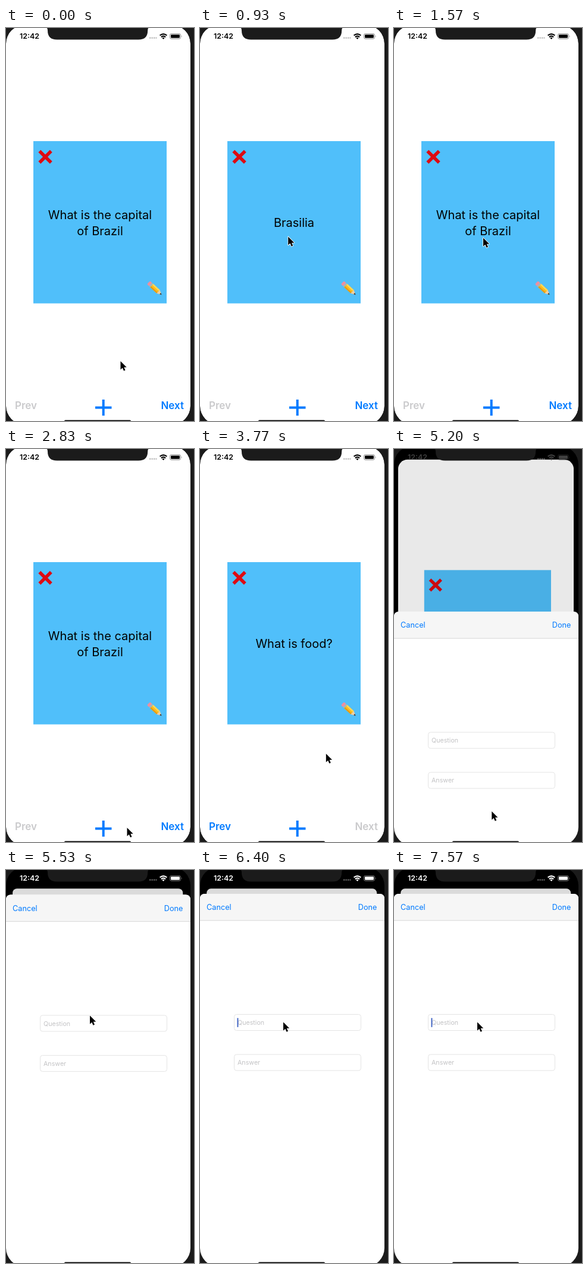
Write an HTML page that moves like this. It is 316 by 660 pixels and loops after 8 s.

```html
<!DOCTYPE html>
<html lang="en">
<head>
<meta charset="utf-8">
<title>Flashcards</title>
<style>
  html, body { margin: 0; width: 100%; height: 100%; overflow: hidden; background: #1b1b1b; }
  svg { display: block; width: 316px; height: 660px; }
  text { font-family: Inter, "Liberation Sans", sans-serif; }
  .card-text { font-size: 20px; text-anchor: middle; }
  .nav { font-size: 17px; font-weight: 600; }
  .bar { font-size: 12.7px; fill: #007aff; }
  .field { fill: #fff; stroke: #e4e4e4; }
  .hint { font-size: 10.7px; fill: #c3c3c5; }
</style>
</head>
<body>
<svg viewBox="0 0 316 660">
  <clipPath id="glass"><rect y="-5" width="310" height="671" rx="31"/></clipPath>

  <g clip-path="url(#glass)">
    <rect y="-5" width="310" height="671"/>

    <g id="deck">
      <rect class="page" y="-5" width="310" height="671" fill="#fff"/>
      <g id="card">
        <rect x="46" y="190" width="224" height="272.5" fill="#50bffa"/>
        <path d="M56.3 206.8 75.8 226M75.8 206.8 56.3 226" stroke="#de0a12" stroke-width="5.6"/>
        <g transform="translate(239.5 427.5) rotate(43)">
          <rect x="0" y="-3.8" width="5" height="7.6" rx="2" fill="#ee8fa0"/>
          <rect x="4.5" y="-3.8" width="3" height="7.6" fill="#a9b4ba"/>
          <rect x="7.5" y="-3.8" width="15" height="7.6" fill="#fdbd1c"/>
          <rect x="7.5" y="-3.8" width="15" height="2.4" fill="#ffd95a"/>
          <rect x="7.5" y="1.6" width="15" height="2.2" fill="#e89a12"/>
          <path d="M22.5-3.8 30 0 22.5 3.8z" fill="#f3cfa0"/>
          <path d="M27-1.6 30.3 0 27 1.6z" fill="#333"/>
        </g>
        <text id="line1" class="card-text" x="158"></text>
        <text id="line2" class="card-text" x="158" y="347.5"></text>
      </g>
      <text id="prev" class="nav" x="15" y="640">Prev</text>
      <text id="next" class="nav" x="299" y="640" text-anchor="end">Next</text>
      <path d="M150 637.5h27.5M163.7 624v27" stroke="#007aff" stroke-width="4"/>
      <rect id="dim" class="page" y="-5" width="310" height="671"/>
    </g>

    <g id="status" fill="currentColor">
      <text x="23" y="18.2" font-size="12.4" font-weight="600">12:42</text>
      <path d="M241 16.7h12.5" stroke="#999" stroke-opacity=".65" stroke-width="2.2" stroke-dasharray="2.4 1.1"/>
      <g fill="none" stroke="currentColor" stroke-width="2">
        <path d="M258.6 12.6q5.9-5 11.8 0M260.8 15.2q3.7-3.2 7.4 0"/>
      </g>
      <path d="M262.4 16.7q2.1-1.7 4.2 0l-2.1 2.2z"/>
      <rect x="275.5" y="9.5" width="18" height="8.8" rx="2.6" fill="none" stroke="currentColor" stroke-opacity=".45"/>
      <rect x="277" y="11" width="15" height="5.8" rx="1.4"/>
      <path d="M294.8 12.2q1.6 1.7 0 3.4z" fill-opacity=".5"/>
    </g>

    <g id="sheet">
      <rect width="310" height="680" rx="8" fill="#fff"/>
      <path d="M0 45V8q0-8 8-8h294q8 0 8 8v37z" fill="#f6f6f6"/>
      <path d="M0 44.8h310" stroke="#cfcfcf" stroke-width=".8"/>
      <text class="bar" x="11" y="27">Cancel</text>
      <text class="bar" x="297.5" y="27" text-anchor="end">Done</text>
      <rect class="field" x="57.5" y="202.5" width="213" height="27" rx="4"/>
      <rect class="field" x="57.5" y="269.8" width="213" height="27" rx="4"/>
      <text class="hint" x="63" y="220">Question</text>
      <text class="hint" x="63" y="287.2">Answer</text>
      <rect id="caret" x="62.5" y="208.5" width="1.9" height="15.5" rx=".8" fill="#3f63c4"/>
    </g>

    <rect x="98" y="658.6" width="112" height="4" rx="2"/>
  </g>

  <path d="M66-1q4 0 4 5 0 15.6 15.6 15.6h137q15.6 0 15.6-15.6 0-5 4-5z" fill="#1b1b1b"/>

  <path id="pointer" d="M0 0v14.2l3.3-3 2.2 5.1 2.5-1.1-2.2-4.9h4.4z"
        stroke="#fff" stroke-width="1.6" stroke-linejoin="round" paint-order="stroke"/>
</svg>

<script>
const LOOP = 8000;
const NEXT_TAP = 3400, SHEET_OPEN = 5086;
const FLIP_STARTS = [560, 1130, 4290], FLIP_TIME = 300;
const BLUE = '#007aff', GREY = '#cacacc';

// time, x, y of the pointer tip
const POINTER_PATH = [
  [0, 192.5, 559.5], [30, 192.5, 559.5], [500, 152, 358], [1000, 148, 350], [1570, 150, 352.5], [1700, 152, 356],
  [2320, 299, 632], [2500, 281, 638], [2830, 203.5, 636], [2970, 203.5, 636],
  [3320, 284, 634], [3450, 284, 634], [4180, 108, 336], [4320, 107, 335.5],
  [4620, 160, 636], [5060, 165, 636], [5200, 164.3, 608.5], [5530, 141, 244.5],
  [6100, 140, 255.5], [LOOP, 140, 255.5]
];

const $ = id => document.getElementById(id);
const clamp = v => Math.min(1, Math.max(0, v));
const mix = (a, b, k) => a + (b - a) * k;
const ease = k => k * k * (3 - 2 * k);
const ramp = (t, from, to) => clamp((t - from) / (to - from));

function pointerAt(t) {
  const i = Math.max(1, POINTER_PATH.findIndex(key => key[0] > t));
  const [t0, x0, y0] = POINTER_PATH[i - 1], [t1, x1, y1] = POINTER_PATH[i];
  const k = ease(ramp(t, t0, t1));
  return [mix(x0, x1, k), mix(y0, y1, k)];
}

// Critically damped spring
function spring(ms) {
  const k = 0.0185 * Math.max(0, ms);
  return 1 - (1 + k) * Math.exp(-k);
}

function drawCard(t) {
  const turns = FLIP_STARTS.reduce((sum, start) => sum + ease(ramp(t, start, start + FLIP_TIME)), 0);
  const width = Math.abs(Math.cos(Math.PI * turns));
  $('card').setAttribute('transform', `translate(158 0) scale(${Math.max(width, 0.001)} 1) translate(-158 0)`);

  const second = t >= NEXT_TAP;
  const answer = Math.round(turns) % 2 === 1;
  const lines = second
    ? [answer ? 'Tasty' : 'What is food?']
    : answer ? ['Brasilia'] : ['What is the capital', 'of Brazil'];
  $('line1').textContent = lines[0];
  $('line2').textContent = lines[1] || '';
  $('line1').setAttribute('y', lines.length > 1 ? 321 : 334.3);
  $('prev').setAttribute('fill', second ? BLUE : GREY);
  $('next').setAttribute('fill', second ? GREY : BLUE);
}

function drawSheet(t) {
  const p = spring(t - SHEET_OPEN);
  const scale = mix(1, 0.923, p);
  $('sheet').setAttribute('transform', `translate(0 ${mix(666, 40, p)})`);
  $('deck').setAttribute('transform', `translate(${155 * (1 - scale) - 0.8 * p} ${35.9 * p}) scale(${scale})`);
  document.querySelectorAll('.page').forEach(page => page.setAttribute('rx', mix(31, 8, p)));
  $('dim').setAttribute('opacity', 0.14 * p);
  const level = Math.round(255 * p ** 3);
  $('status').style.color = `rgb(${level},${level},${level})`;

  const shown = t < 7000 ? (t >= 6270 ? 1 - ramp(t, 6690, 6830) : 0) : ramp(t, 7400, 7570);
  $('caret').setAttribute('opacity', shown);
}

function draw() {
  const t = performance.now() % LOOP;
  drawCard(t);
  drawSheet(t);
  $('pointer').setAttribute('transform', `translate(${pointerAt(t)})`);
  requestAnimationFrame(draw);
}
draw();
</script>
</body>
</html>
```
